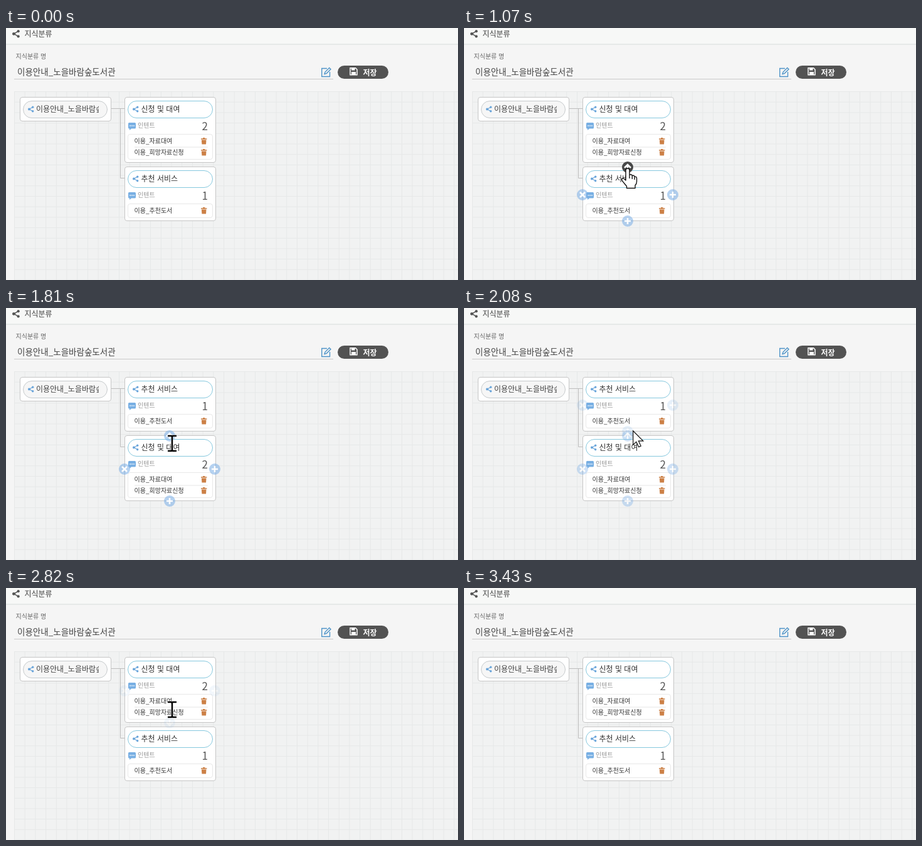
Recreate the animation shown at these times as an HTML page. Size 721 px wide and 402 px high, loop 3.77 s.

```html
<!DOCTYPE html>
<html lang="ko">
<head>
<meta charset="utf-8">
<style>
  html, body { margin: 0; width: 100%; height: 100%; overflow: hidden; background: #f5f5f5; }
  svg { display: block; width: 721px; height: 402px; font-family: "Noto Sans CJK KR", "Noto Sans CJK", sans-serif; }
</style>
</head>
<body>
<svg id="stage" viewBox="0 0 721 402">
  <defs>
    <pattern id="grid" x="13" y="101" width="16.7" height="16.7" patternUnits="userSpaceOnUse">
      <path d="M0 .5H17M.5 0V17" stroke="#e6e8e8"/>
    </pattern>
    <clipPath id="rootClip"><rect x="48" y="116" width="100" height="28"/></clipPath>
    <g id="share">
      <path d="M8 1.5L2 5L8 8.5" fill="none" stroke="currentColor" stroke-width="1.2"/>
      <g fill="currentColor"><circle cx="7.7" cy="1.7" r="1.7"/><circle cx="1.9" cy="5" r="1.9"/><circle cx="7.7" cy="8.3" r="1.7"/></g>
    </g>
    <g id="bubble">
      <path d="M1.5 0H10.5Q12 0 12 1.5V8Q12 9.5 10.5 9.5H5L2 12V9.5H1.5Q0 9.5 0 8V1.5Q0 0 1.5 0Z" fill="#78afe3"/>
      <path d="M2.3 5H4M5.2 5H6.9M8.1 5H9.8" stroke="#fff" stroke-width="1.7"/>
    </g>
    <g id="trash" fill="#cc8046">
      <path d="M0 1.3H3V0H6.4V1.3H9.4V2.7H0Z"/><path d="M.9 3.5H8.5L8 10.5H1.4Z"/>
    </g>
    <path id="arrow" d="M.7 1V23.2L5.8 18.5L9.7 26.7L13.2 25.1L9.4 17.1H16.8Z" fill="#fff" stroke="#111" stroke-width="1.2"/>
    <path id="hand" d="M-3 15V4Q-3 1 0 1Q3 1 3 4V11Q6.5 10 7.3 12.5Q10.3 11.5 11 14.2Q14.5 13.5 14.5 17V22Q14.5 25.5 12 28V32.5H-1.5V29.5L-8.5 21Q-10.5 18 -8.3 17Q-6.5 16 -3 20V15M3 11V17M7.3 12.5V18M11 14.5V19" fill="#fff" stroke="#111" stroke-width="1.4" stroke-linejoin="round"/>
    <g id="ibeam" fill="none">
      <path d="M-7.5 -12H7.5M-7.5 12H7.5M0 -12V12" stroke="#fff" stroke-width="4" opacity=".7"/>
      <path d="M-7 -12H-1L0 -11L1 -12H7M-7 12H-1L0 11L1 12H7M0 -11V11" stroke="#000" stroke-width="2.5"/>
    </g>
  </defs>

  <rect width="721" height="402" fill="#f5f5f5"/>
  <rect width="721" height="25" fill="#f7f8f7"/>
  <path d="M0 26H721" stroke="#e6e9e8" stroke-width="2"/>
  <use href="#share" transform="translate(10 3) scale(1.25)" color="#555"/>
  <text x="29.5" y="14" font-size="12" fill="#444">지식분류</text>
  <text x="15.5" y="49" font-size="10" fill="#666">지식분류 명</text>
  <text x="18" y="75" font-size="13.5" fill="#444">이용안내_노을바람숲도서관</text>
  <path d="M13 81.5H522" stroke="#c9c9c9"/>
  <g fill="none" stroke="#4f94c8" stroke-width="1.4">
    <path d="M512 64.5H503.7V77.5H516.5V70"/>
    <path d="M508 73.5L509 70.3L515.7 63.5L518 65.8L511.2 72.6Z"/>
  </g>
  <rect x="529" y="60" width="81" height="21" rx="10.5" fill="#535353"/>
  <path d="M549 63.8H557.5L560 66.3V74.8H549Z" fill="none" stroke="#fff" stroke-width="1.5"/>
  <path d="M551 64H556.5V67.5H551ZM551 70H558V75H551Z" fill="#fff"/>
  <text x="569.5" y="76" font-size="12" font-weight="700" fill="#fff">저장</text>

  <rect x="13" y="101" width="708" height="301" fill="#f1f2f2"/>
  <rect x="13" y="101" width="708" height="301" fill="url(#grid)"/>
  <rect x="22.5" y="110.5" width="145" height="38" rx="3.5" fill="#fff" stroke="#c6c6c6"/>
  <rect x="27.5" y="116.5" width="134" height="27" rx="13.5" fill="#f6f6f6" stroke="#c6cacc"/>
  <use href="#share" x="35" y="124.5" color="#6aa5da"/>
  <text x="48" y="134" font-size="12" fill="#444" clip-path="url(#rootClip)">이용안내_노을바람숲도서관</text>
  <g id="scene"></g>
</svg>
<script>
const LOOP = 3770, STEP = 67.4, LEAD = 20;
const scene = document.getElementById('scene');

const loan = { title: '신청 및 대여', rows: ['이용_자료대여', '이용_희망자료신청'] };
const picks = { title: '추천 서비스', rows: ['이용_추천도서'] };
const cardHeight = card => 68 + 18 * card.rows.length;

const path = [[4, 497, 390], [5, 428, 356], [6, 367, 325], [8, 300, 291], [11, 274, 246], [13, 263, 228],
  [15, 261, 223], [26, 261, 223], [27, 265, 216], [30, 269, 195], [34, 268, 193], [36, 264, 193],
  [41, 264, 193], [42, 265, 194], [44, 382, 241], [47, 597, 327], [48, 632, 351], [50, 664, 392]];
// Shape in use from each step on
const shapes = [[4, 'arrow'], [11, 'ibeam'], [13, 'hand'], [21, 'ibeam'], [29, 'arrow'], [35, 'hand'], [41, 'ibeam'], [43, 'arrow']];

function along(points, step) {
  if (step <= points[0][0]) return points[0].slice(1);
  const i = points.findIndex(p => p[0] >= step);
  if (i < 0) return points.at(-1).slice(1);
  const a = points[i - 1], b = points[i], k = (step - a[0]) / (b[0] - a[0]);
  return a.slice(1).map((v, j) => v + (b[j + 1] - v) * k);
}

function drawCard(card, top) {
  const height = cardHeight(card);
  const rows = card.rows.map((name, i) => {
    const y = 18 * i;
    return `${i ? `<path d="M205 ${61.5 + y + .5}H322" stroke="#e6e6e6"/>` : ''}
      <text x="204.5" y="${74 + y}" font-size="10" fill="#333">${name}</text>
      <use href="#trash" x="311" y="${65 + y}"/>`;
  }).join('');
  return `<g transform="translate(0 ${top})">
    <rect x="189.5" y=".5" width="145" height="${height}" rx="3.5" fill="#fff" stroke="#c6c6c6"/>
    <rect x="194.5" y="6.5" width="135" height="27" rx="13.5" fill="#fff" stroke="#86c8de"/>
    <use href="#share" x="202" y="14.5" color="#6aa5da"/>
    <text x="215.5" y="24" font-size="12" fill="#333">${card.title}</text>
    <use href="#bubble" x="195" y="41"/>
    <text x="210" y="49" font-size="10" fill="#999">인텐트</text>
    <text x="322" y="53" font-size="17" fill="#555" text-anchor="end">${card.rows.length}</text>
    <rect x="194.5" y="59.5" width="135" height="${height - 64}" rx="3.5" fill="#fff" stroke="#e8e8e8"/>
    ${rows}</g>`;
}

const icons = {
  plus: 'M-5 0H5M0 -5V5',
  cross: 'M-4 -4L4 4M4 -4L-4 4',
  up: 'M0 5V-3M-5 1L0 -4L5 1',
  down: 'M0 -5V3M-5 -1L0 4L5 -1'
};

function drawButton(x, y, icon, alpha, active) {
  return `<g transform="translate(${x} ${y})" opacity="${alpha}">
    <circle r="9" fill="${active ? '#484848' : '#79ade6'}" fill-opacity="${active ? 1 : .55}"/>
    <path d="${icons[icon]}" fill="none" stroke="#fff" stroke-width="2.6"/></g>`;
}

function drawButtons(card, top, isFirst, alpha, active) {
  if (alpha <= 0) return '';
  const bottom = top + cardHeight(card) + 1, middle = Math.round((top + bottom) / 2) + 1;
  return drawButton(189, middle, 'cross', alpha) + drawButton(333, middle, 'plus', alpha) +
    (isFirst ? drawButton(261, bottom, 'down', alpha, active)
      : drawButton(261, top + 1, 'up', alpha, active) + drawButton(261, bottom, 'plus', alpha));
}

function draw(step) {
  const [first, second] = step >= 21 && step < 41 ? [picks, loan] : [loan, picks];
  const top = 110, nextTop = top + cardHeight(first) + 7;
  const [firstAlpha] = along([[30, 0], [33, 1], [40, 1], [41, .06], [42, .17], [43, .3], [46, 0]], step);
  const [secondAlpha] = along([[7, 0], [8, .25], [11, 1], [20, 1], [21, .3], [23, 1], [30, 1], [33, 0]], step);

  let out = `<path d="M168 128.5H189M182.5 128.5V${nextTop + 18.5}H189" fill="none" stroke="#bdbdbd"/>` +
    drawCard(first, top) + drawCard(second, nextTop) +
    drawButtons(first, top, true, firstAlpha, step >= 35 && step < 41) +
    drawButtons(second, nextTop, false, secondAlpha, step >= 13 && step < 21);

  if (step >= 4 && step < 51) {
    const [x, y] = along(path, step);
    const clicking = step === 19 || step === 20 || step === 40;
    if (clicking) out += `<circle cx="${x}" cy="${y}" r="18" fill="#ff0" fill-opacity=".47"/>`;
    const shape = shapes.findLast(s => s[0] <= step)[1];
    out += `<use href="#${shape}" x="${Math.round(x)}" y="${Math.round(y)}"/>`;
  }
  scene.innerHTML = out;
}

let shown = -1;
function tick() {
  const step = Math.floor((performance.now() % LOOP + LEAD) / STEP);
  if (step !== shown) draw(shown = step);
  requestAnimationFrame(tick);
}
tick();
</script>
</body>
</html>
```
